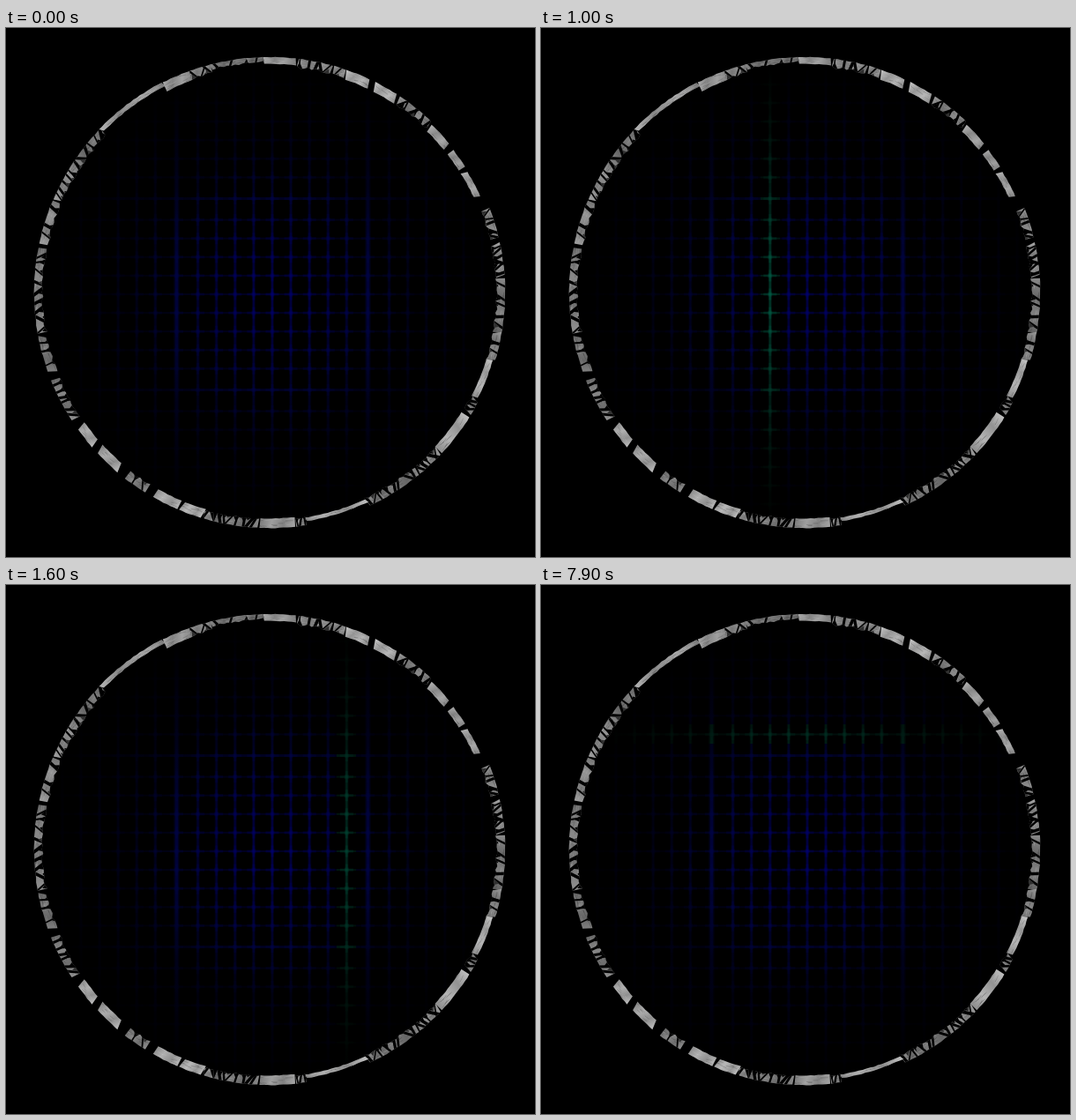
These frames come from a looping animation (600x600 px, 8000 ms). An HTML page with a canvas:

```html
<!DOCTYPE html>
<html lang="en">
<head>
<meta charset="utf-8">
<title>Grid sweep</title>
<style>
html, body { margin: 0; width: 100%; height: 100%; overflow: hidden; background: #000; }
canvas { display: block; width: 100vmin; height: 100vmin; }
</style>
</head>
<body>
<canvas id="stage" width="600" height="600"></canvas>
<script>
const SIZE = 600, LOOP = 8000, MID = 302, HALF = 11, REACH = 11;
const stage = document.getElementById('stage').getContext('2d');

function layer() {
  const c = document.createElement('canvas');
  c.width = c.height = SIZE;
  return c.getContext('2d');
}

function seeded(s) {
  return () => {
    s = (s + 0x6D2B79F5) | 0;
    let n = Math.imul(s ^ (s >>> 15), 1 | s);
    n = (n + Math.imul(n ^ (n >>> 7), 61 | n)) ^ n;
    return ((n ^ (n >>> 14)) >>> 0) / 4294967296;
  };
}

// Lines sit 21.1 px apart, with a wider step on both sides of the fifth one.
function pos(i) {
  const n = Math.abs(i);
  return MID + 21.1 * i + Math.sign(i) * ((n > 4 ? 3 : 0) + (n > 5 ? 3 : 0));
}

function drawMask() {
  const g = layer();
  const bar = (x, y, w, h, a) => {
    g.fillStyle = `rgba(255,255,255,${a})`;
    g.fillRect(x - w / 2, y - h / 2, w, h);
  };
  for (let i = -HALF; i <= HALF; i++) {
    const p = pos(i), heavy = Math.abs(i) === 5;
    bar(p, MID, heavy ? 6 : 4, 530, heavy ? 0.45 : 0.22);
    bar(p, MID, heavy ? 3 : 2, 530, heavy ? 0.6 : 0.42);
    bar(MID, p, 530, heavy ? 3 : 2, heavy ? 0.45 : 0.3);
    for (let j = -HALF; j <= HALF; j++) {
      const q = pos(j);
      bar(q, p, 15, 3, 0.28);
      bar(q, p, 3, 13, 0.3);
      bar(q, p, 5, 5, 0.25);
    }
  }
  return g.canvas;
}

function tint(mask, stops) {
  const g = layer();
  g.drawImage(mask, 0, 0);
  g.globalCompositeOperation = 'source-in';
  const glow = g.createRadialGradient(MID, MID, 0, MID, MID, 262);
  stops.forEach(([at, color]) => glow.addColorStop(at, color));
  g.fillStyle = glow;
  g.fillRect(0, 0, SIZE, SIZE);
  return g.canvas;
}

// Stone pieces: start and end in degrees clockwise from the top,
// number of cracks, then inner and outer radius if unusual.
const PIECES = [
  [-1.5, 6.5, 0, 259], [7, 15.5, 5], [16, 19, 1], [19.3, 25.4, 0], [27, 33, 0],
  [33.8, 43.5, 6], [44.2, 50.5, 0, 255, 265], [52.2, 57.2, 0, 255, 264],
  [58.4, 65.2, 0, 255, 263], [69, 76.5, 5], [78, 86, 6], [86.5, 100, 5],
  [100, 107, 2], [107, 117, 0, 257, 265], [117.5, 121, 3], [122, 133, 0],
  [133.2, 140, 5], [140.5, 151, 5], [151, 155, 3], [155, 171, 0, 258, 263],
  [171, 173.5, 3], [173.7, 182.4, 0], [182.8, 193.5, 7], [194, 196.5, 2],
  [196.7, 202.3, 0], [203, 209.6, 0], [211.9, 217.9, 2], [220.6, 227.3, 0],
  [229.2, 234.7, 0], [237, 248, 6], [250, 259, 3], [260, 281, 9],
  [282, 293, 3], [293.5, 304, 6], [304, 314, 5], [314, 333, 0, 262, 268],
  [333, 340, 0], [340, 345.5, 3], [345.5, 355, 3, 260], [354.5, 358.5, 1, 261]
];

function drawRing() {
  const g = layer(), rnd = seeded(19);
  const at = (deg, r) => {
    const a = deg * Math.PI / 180;
    return [299 + r * Math.sin(a), 300 - r * Math.cos(a)];
  };
  const line = (a, b, color, width) => {
    g.strokeStyle = color;
    g.lineWidth = width;
    g.beginPath();
    g.moveTo(...a);
    g.lineTo(...b);
    g.stroke();
  };
  for (const [from, to, cracks, inner = 256, outer = 267.5] of PIECES) {
    const span = to - from, tone = (cracks ? 120 : 155) + rnd() * 30;
    const lean = (rnd() - 0.5) * 0.8;
    const steps = Math.ceil(span);
    g.save();
    g.beginPath();
    for (let k = 0; k <= steps; k++) g.lineTo(...at(from + span * k / steps + lean, outer - rnd() * 0.7));
    for (let k = steps; k >= 0; k--) g.lineTo(...at(from + span * k / steps - lean, inner + rnd() * (cracks ? 3 : 0.7)));
    g.closePath();
    const shade = g.createLinearGradient(...at(from, outer), ...at(to, inner));
    [1.08, 0.82, 1, 0.78].forEach((k, n) => {
      const v = Math.round(tone * k);
      shade.addColorStop(n / 3, `rgb(${v},${v},${v})`);
    });
    g.fillStyle = shade;
    g.fill();
    g.clip();
    for (let k = 0; k < span * 2; k++) {
      const a = from + rnd() * span, r = inner + rnd() * (outer - inner);
      line(at(a, r), at(a + 1 + rnd(), r + rnd() * 3 - 1.5),
        rnd() < 0.5 ? 'rgba(0,0,0,.2)' : 'rgba(225,225,225,.16)', 0.8);
    }
    for (let k = 0; k < cracks; k++) {
      const a = from + (k + 0.2 + rnd() * 0.6) * span / cracks, tilt = (rnd() - 0.5) * 5;
      line(at(a - tilt / 2, 254), at(a + tilt / 2, 269), '#000', 1.5 + rnd() * 2.2);
      g.fillStyle = rnd() < 0.65 ? '#000' : '#303030';
      g.beginPath();
      g.moveTo(...at(a - 1, 254));
      g.lineTo(...at(a + 1.2, 254));
      g.lineTo(...at(a + tilt / 4, 259 + rnd() * 5));
      g.fill();
    }
    g.restore();
  }
  return g.canvas;
}

const mask = drawMask();
const blue = tint(mask, [
  [0, '#000078'], [0.2, '#000060'], [0.42, '#000346'],
  [0.62, '#00011f'], [0.85, '#00000c'], [1, '#000']
]);
const green = tint(mask, [
  [0, '#007a5c'], [0.3, '#004a37'], [0.5, '#003225'],
  [0.7, '#001710'], [0.9, '#000805'], [1, '#000']
]);
const ring = drawRing();

function strip(x, y, w, h) {
  stage.fillRect(x, y, w, h);
  stage.drawImage(green, x, y, w, h, x, y, w, h);
}

function render(t) {
  stage.fillStyle = '#000';
  stage.fillRect(0, 0, SIZE, SIZE);
  stage.drawImage(blue, 0, 0);
  const step = Math.floor(t / 100);
  if (step >= 78) {
    strip(0, Math.round(pos(step - 85)) - REACH, SIZE, REACH * 2);
  } else if (step >= 5) {
    strip(Math.round(pos(Math.min(step - 12, 8))) - REACH, 0, REACH * 2, SIZE);
  }
  stage.drawImage(ring, 0, 0);
}

function tick() {
  render(performance.now() % LOOP);
  requestAnimationFrame(tick);
}
tick();
</script>
</body>
</html>
```
